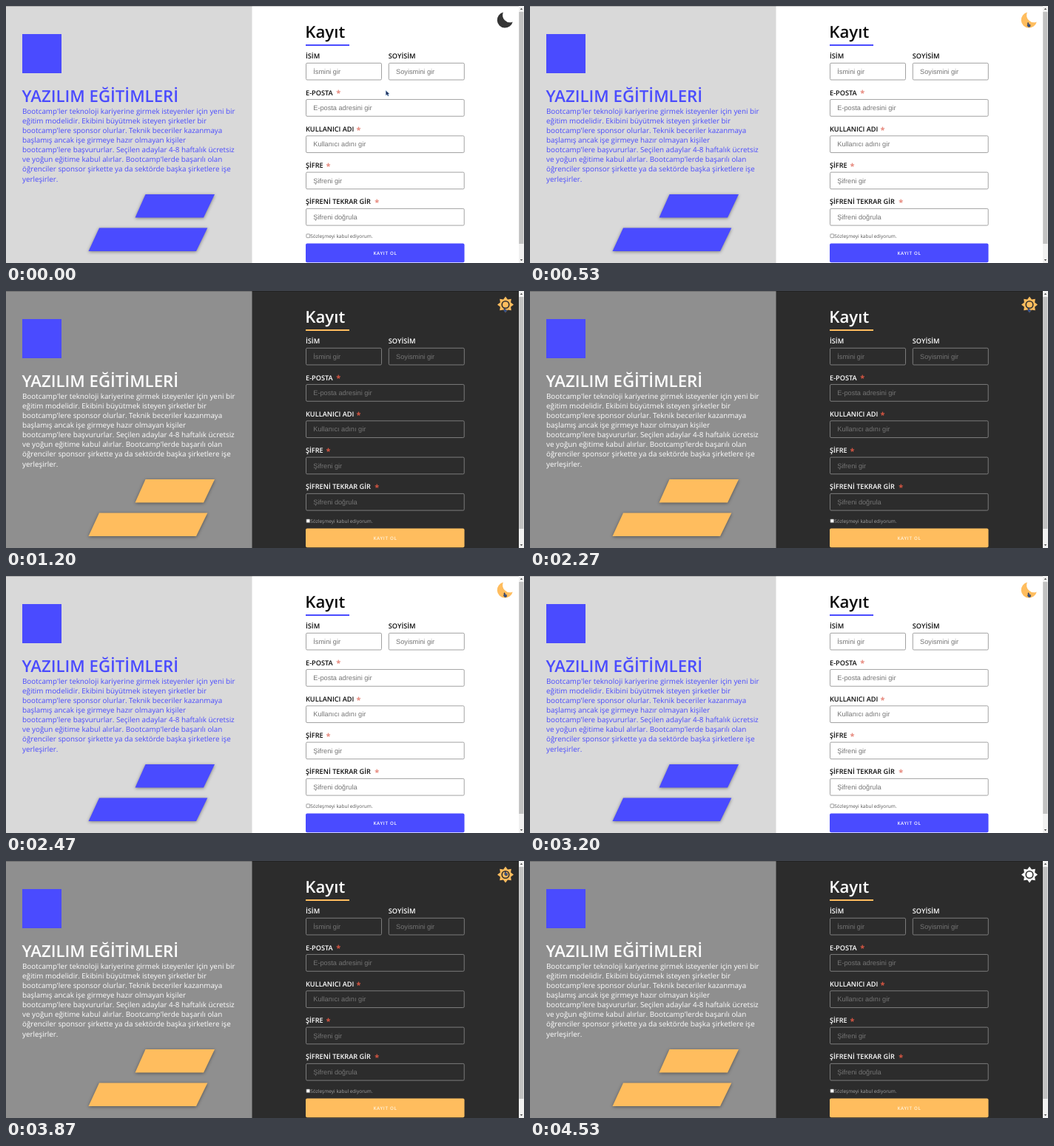
These frames come from a looping animation (700x348 px, 4590 ms). An HTML page:

```html
<!DOCTYPE html>
<html lang="tr">
<head>
<meta charset="utf-8">
<title>Kayıt</title>
<style>
  html, body { margin: 0; width: 100%; height: 100%; overflow: hidden; }
  svg {
    display: block; width: 100vw; height: 100vh;
    font-family: "Open Sans", "Noto Sans", sans-serif;
    text-rendering: geometricPrecision;
    --page: #fff; --side: #d9d9d9; --accent: #4a4bff; --ink: #0c0c0c;
    --copy: #4a4bff; --line: #989898; --hint: #757575; --star: #e68478;
    --note: #555; --icon: #343434; --btn: #fff;
  }
  svg.dark {
    --page: #2c2c2c; --side: #8f8f8f; --accent: #ffbd5e; --ink: #fff;
    --copy: #fff; --line: #858585; --star: #dc5743;
    --note: #a2a2a2; --icon: #fff; --btn: #fff3dc;
  }
  svg.hover { --icon: #ffbd5e; }
  .page { fill: var(--page); }
  .side { fill: var(--side); }
  .accent { fill: var(--accent); }
  .logo { fill: #4a4bff; }
  .copy { fill: var(--copy); font-size: 9.84px; }
  .head { fill: var(--copy); font-size: 22.2px; font-weight: 600; }
  .title { fill: var(--ink); font-size: 22.2px; font-weight: 600; }
  .label { fill: var(--ink); font-size: 9.2px; font-weight: 600; }
  .star { fill: var(--star); font-size: 11px; font-weight: 700; }
  .field { fill: none; stroke: var(--line); stroke-width: .9; }
  .hint { fill: var(--hint); font: 9.2px "Liberation Sans", Arial, sans-serif; }
  .note { fill: var(--note); font-size: 6.5px; font-weight: 500; }
  .btn { fill: var(--btn); font-size: 6.2px; font-weight: 600; letter-spacing: .7px; }
  .icon { fill: var(--icon); fill-rule: evenodd; }
  .shape { filter: drop-shadow(0 1.5px 2px rgba(0, 0, 0, .42)); }
  .sun, .dark .moon { display: none; }
  .dark .sun { display: inline; }
</style>
</head>
<body>
<svg id="stage" viewBox="0 0 700 348" preserveAspectRatio="none">
  <rect class="page" width="700" height="348"/>
  <rect class="side" width="332.5" height="348"/>
  <rect class="logo" x="22" y="38" width="53" height="53"/>
  <text class="head" x="21.5" y="130">YAZILIM EĞİTİMLERİ</text>
  <g id="copy"></g>
  <path class="accent shape" d="M188.5 255H282L267 286.5H174.5Z"/>
  <path class="accent shape" d="M126 300.5H272.3L257 332H111.5Z"/>

  <text class="title" x="404.3" y="43.3">Kayıt</text>
  <rect class="accent" x="405" y="52" width="59" height="2"/>
  <g id="form"></g>
  <rect x="405.9" y="308.9" width="4.8" height="4.8" rx=".7" fill="#fff" stroke="#767676" stroke-width=".7"/>
  <text class="note" x="411.3" y="314">Sözleşmeyi kabul ediyorum.</text>
  <rect class="accent" x="405" y="321.6" width="214.5" height="25.7" rx="2"/>
  <text class="btn" x="512.5" y="336.8" text-anchor="middle">KAYIT OL</text>

  <rect width="693" height=".7" fill="#000" opacity=".3"/>
  <rect x="693" width="7" height="348" fill="#f1f1f1"/>
  <rect x="693.2" y="8" width="6.2" height="314" fill="#c1c1c1"/>
  <path d="M694.8 5L696.5 2.8L698.2 5ZM694.8 343L696.5 345.2L698.2 343Z" fill="#505050"/>

  <path class="icon moon" d="M671.9 8.6A10.65 10.65 0 1 0 684.7 21.5A9.84 9.84 0 0 1 671.9 8.6Z"/>
  <path class="icon sun" id="sun"/>
  <g id="cursor">
    <path id="arrow" d="M0 0V6.6L1.6 5.3L2.7 7.6L3.9 7L2.8 4.8L4.8 4.6Z" fill="#22305c" stroke="#7db4dc" stroke-width=".4"/>
    <path id="hand" transform="scale(.8)" d="M.8 0Q1.8 -.2 1.9 .9V2.8L4.3 3.4Q5 3.7 4.8 4.6L4.2 7.2H1.2L-.5 4.6Q-.4 3.7 .2 4.1V.9Q.2 .1 .8 0Z" fill="#35548f" stroke="#26293a" stroke-width=".6"/>
  </g>
</svg>
<script>
const LOOP = 4590, STEP = 200 / 3;
const $ = id => document.getElementById(id);
const stage = $('stage');

function add(parent, tag, attrs, text = '') {
  const el = document.createElementNS('http://www.w3.org/2000/svg', tag);
  for (const key in attrs) el.setAttribute(key, attrs[key]);
  el.textContent = text;
  parent.append(el);
}

[
  "Bootcamp'ler teknoloji kariyerine girmek isteyenler için yeni bir",
  'eğitim modelidir. Ekibini büyütmek isteyen şirketler bir',
  "bootcamp'lere sponsor olurlar. Teknik beceriler kazanmaya",
  'başlamış ancak işe girmeye hazır olmayan kişiler',
  "bootcamp'lere başvururlar. Seçilen adaylar 4-8 haftalık ücretsiz",
  "ve yoğun eğitime kabul alırlar. Bootcamp'lerde başarılı olan",
  'öğrenciler sponsor şirkette ya da sektörde başka şirketlere işe',
  'yerleşirler.'
].forEach((line, i) => add($('copy'), 'text', { class: 'copy', x: 22, y: 145.6 + i * 13.13 }, line));

// x, row, width, label, placeholder, asterisk x
[
  [405.5, 0, 102, 'İSİM', 'İsmini gir'],
  [517.3, 0, 102, 'SOYİSİM', 'Soyismini gir'],
  [405.5, 1, 213.7, 'E-POSTA', 'E-posta adresini gir', 446.2],
  [405.5, 2, 213.7, 'KULLANICI ADI', 'Kullanıcı adını gir', 473.4],
  [405.5, 3, 213.7, 'ŞİFRE', 'Şifreni gir', 432.5],
  [405.5, 4, 213.7, 'ŞİFRENİ TEKRAR GİR', 'Şifreni doğrula', 498.2]
].forEach(([x, row, width, label, hint, star]) => {
  const y = 77.3 + row * 49.27, form = $('form');
  add(form, 'text', { class: 'label', x: x - .5, y: y - 6 }, label);
  if (star) add(form, 'text', { class: 'star', x: star, y: y - 4.3 }, '*');
  add(form, 'rect', { class: 'field', x, y, width, height: 22.7, rx: 1.5 });
  add(form, 'text', { class: 'hint', x: x + 9.8, y: y + 14.6 }, hint);
});

const disc = r => `M${675 - r} 18.5a${r} ${r} 0 1 0 ${2 * r} 0a${r} ${r} 0 1 0 ${-2 * r} 0Z`;
const rays = Array.from({ length: 16 }, (_, i) => {
  const r = i % 2 ? 7.7 : 11, a = i * Math.PI / 8;
  return [675 + r * Math.sin(a), 18.5 - r * Math.cos(a)].map(v => v.toFixed(2));
});
$('sun').setAttribute('d', `M${rays.join('L')}Z${disc(5.6)}${disc(4)}`);

// time, x, y
const path = [
  [0, 513.3, 114.5], [530, 672.3, 22.5], [730, 672.8, 22.8], [3600, 672.8, 22.8],
  [3930, 674, 13], [4070, 674, 3], [4330, 672.5, 1], [4530, 672, -10], [LOOP, 672, -10]
];
const ease = p => p * p * (3 - 2 * p);

function cursorAt(t) {
  const i = path.findIndex(k => t < k[0]);
  const [a, b] = [path[i - 1], path[i]];
  const p = ease((t - a[0]) / (b[0] - a[0]));
  return [a[1] + (b[1] - a[1]) * p, a[2] + (b[2] - a[2]) * p];
}

function draw(now) {
  const t = now % LOOP;
  const tick = Math.floor((t + 4) / STEP) * STEP;
  const [x, y] = cursorAt(Math.min(tick, LOOP - 1));
  const hover = t >= 470 && t < 4000;
  stage.classList.toggle('dark', t >= 1200 && t < 2470 || t >= 3270);
  stage.classList.toggle('hover', hover);
  $('cursor').setAttribute('transform', `translate(${x.toFixed(2)} ${y.toFixed(2)})`);
  $('hand').style.display = hover ? '' : 'none';
  $('arrow').style.display = hover ? 'none' : '';
}

let start;
function loop(now) {
  start ??= now;
  draw(now - start);
  requestAnimationFrame(loop);
}
draw(0);
requestAnimationFrame(loop);
</script>
</body>
</html>
```
